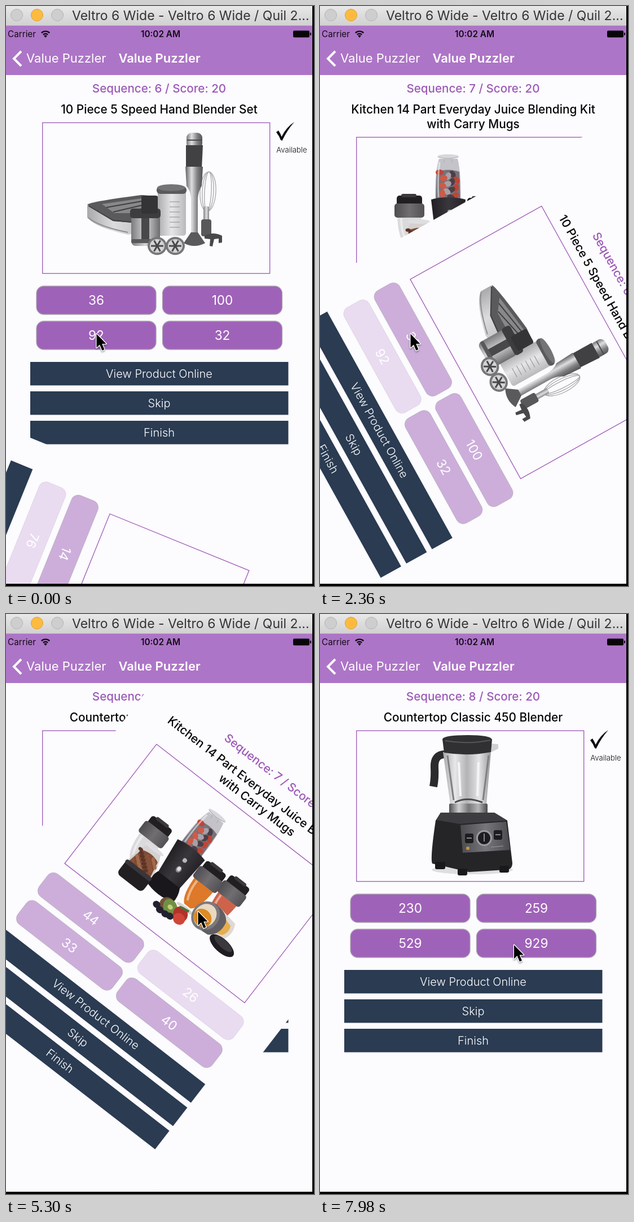
Animation of 546x1025 px, one loop 8 s. Source, as an HTML page with a canvas:

```html
<!DOCTYPE html>
<html lang="en">
<head>
<meta charset="utf-8">
<title>Value Puzzler</title>
<style>
html, body { margin: 0; width: 100%; height: 100%; overflow: hidden; background: #000; }
canvas { display: block; }
</style>
</head>
<body>
<canvas id="stage" width="546" height="1025"></canvas>
<script>
const ctx = document.getElementById('stage').getContext('2d');
const LOOP = 8000, MID = 271.5, CENTER_Y = 528;
const PAPER = '#fcfbfe', PURPLE = '#9b59b6', BUTTON = '#9f62b9', NAVY = '#2a3b52', NAV = '#ad75c7';
const SANS = 'Inter, sans-serif', HELV = '"Liberation Sans", Arial, sans-serif';

function box(color, x, y, w, h, r = 0) {
  ctx.fillStyle = color;
  ctx.beginPath();
  ctx.roundRect(x, y, w, h, r);
  ctx.fill();
}
function oval(color, x, y, rx, ry = rx, turn = 0) {
  ctx.fillStyle = color;
  ctx.beginPath();
  ctx.ellipse(x, y, rx, ry, turn, 0, 7);
  ctx.fill();
}
function shape(color, d) {
  ctx.fillStyle = color;
  ctx.fill(new Path2D(d));
}
function line(color, width, d) {
  ctx.strokeStyle = color;
  ctx.lineWidth = width;
  ctx.stroke(new Path2D(d));
}
function text(str, x, y, font, color, align = 'center') {
  ctx.font = font;
  ctx.fillStyle = color;
  ctx.textAlign = align;
  ctx.fillText(str, x, y);
}
function shade(x0, x1, ...colors) {
  const g = ctx.createLinearGradient(x0, 0, x1, 0);
  colors.forEach((c, i) => g.addColorStop(i / (colors.length - 1), c));
  return g;
}

function handBlender() {
  shape(shade(144, 236, '#a9a9ab', '#dcdcde', '#c4c4c6'), 'M144 352L190 374L280 366L236 401L216 404Q160 392 144 374Z');
  shape('#5a5a5c', 'M144 351Q148 346 240 334L280 337L278 362L236 384L190 380Z');
  shape('#88888a', 'M170 350L240 340L262 342L226 366L192 366Z');
  line('#3f3f41', 2, 'M178 356L246 344M190 364L250 350M146 353L190 379L236 383');
  line('#8e8e90', 2, 'M146 374Q165 390 216 400');
  box(shade(268, 319, '#a9a9ab', '#e6e6e8', '#b9b9bb'), 269, 322, 50, 84, 5);
  for (let y = 346; y < 398; y += 9) line('#8d8d90', 1, `M290 ${y}h18`);
  box('#5a5a5c', 267, 319, 53, 13, 6);
  oval('#747476', 293, 321, 25, 6);
  box(shade(221, 273, '#77777a', '#d5d5d7', '#6c6c6f'), 222, 368, 51, 56, 8);
  box('#48484a', 240, 366, 14, 50, 4);
  box('#59595b', 222, 412, 51, 7, 3);
  box('#3d3d3f', 220, 358, 54, 17, 5);
  box('#343436', 240, 335, 29, 32, 4);
  ctx.strokeStyle = '#a6a6a9';
  ctx.lineWidth = 1.3;
  for (const r of [6, 10, 14]) {
    ctx.beginPath();
    ctx.ellipse(358, 328, r, 35, .05, 0, 7);
    ctx.stroke();
  }
  box(shade(350, 361, '#858588', '#dededf', '#707073'), 350, 354, 10, 30, 3);
  box('#58585b', 346, 377, 18, 30, 4);
  const steel = shade(319, 349, '#6d6d70', '#dededf', '#818184', '#505053');
  box(steel, 320, 224, 28, 28, 9);
  line('#4b4b4e', 2, 'M321 237H347');
  shape('#414144', 'M319 246H349L347 287H319Z');
  shape(steel, 'M318 284H349L347 318Q341 327 340 340V402H328V340Q327 326 320 318Z');
  shape('#5a5a5d', 'M328 400H340L353 419Q334 429 315 419Z');
  for (const x of [268, 300]) {
    oval('#77777a', x, 424, 17, 16);
    oval('#d4d4d6', x, 424, 13, 12);
    for (let a = 0; a < 6.2; a += 1.05)
      line('#48484b', 3, `M${x} 424l${11 * Math.cos(a)} ${11 * Math.sin(a)}`);
  }
  shape('#48484b', 'M352 406Q367 398 383 406V418L377 419V411L369 412L366 425L361 424L362 412L352 411Z');
}

function travelCup(x, y, w, juice) {
  shape(juice, `M${x + 5} ${y + 36}H${x + w - 5}Q${x + w - 6} ${y + 78} ${x + w / 2 + 7} ${y + 88}H${x + w / 2 - 7}Q${x + 6} ${y + 78} ${x + 5} ${y + 36}Z`);
  line('rgba(255,255,255,.45)', 4, `M${x + 12} ${y + 42}Q${x + 12} ${y + 66} ${x + 20} ${y + 80}`);
  box('#211f22', x + 4, y + 2, w - 8, 18, 5);
  box('#3b393c', x + 12, y - 1, w - 26, 6, 3);
  box(shade(x, x + w, '#4e4c50', '#716e72', '#535155'), x, y + 16, w, 25, 5);
}

function drinkSet() {
  travelCup(306, 331, 51, '#cf634a');
  travelCup(132, 333, 53, '#dadadd');
  oval('#d9d3d0', 282, 431, 18, 4);
  travelCup(257, 337, 52, '#dd7928');
  shape('#c3c3c9', 'M211 270H244Q251 300 249 343H205Q202 300 211 270Z');
  shape('#77727a', 'M207 293Q228 286 247 293L249 343H205Z');
  for (let i = 0; i < 14; i++)
    oval(['#bd4537', '#4b4048', '#a9a0a5', '#cf5a48'][i % 4], 212 + i * 23 % 31, 294 + i * 3.4, 7, 5, i);
  line('rgba(255,255,255,.5)', 3, 'M212 276Q208 305 210 338');
  oval('#d8d8dc', 227, 266, 19, 4);
  line('#aaaab0', 1, 'M210 267Q227 272 245 267M220 271V277M234 271V277');
  shape(shade(197, 258, '#201e21', '#3a373c', '#242226'), 'M197 342Q227 334 258 342L253 410H205Z');
  shape('#19171b', 'M204 408H253Q260 421 259 435Q228 445 199 435Q200 419 204 408Z');
  oval('#b7b7bb', 230, 364, 4);
  oval('#8a8a8e', 231, 383, 5, 6);
  oval('#e0e0e2', 231, 382, 3, 4);
  shape('#d5d1d0', 'M162 381H189Q202 402 202 426H150Q151 397 162 381Z');
  shape('#7d4c36', 'M158 396Q176 388 194 396L200 426H152Z');
  for (let i = 0; i < 20; i++)
    oval(['#5d3426', '#a36a4a', '#8a5239'][i % 3], 156 + i * 29 % 41, 396 + i * 1.4, 4.5, 3, i);
  oval('#dedee0', 175, 381, 20, 4);
  box('#221f23', 148, 424, 56, 32, 8);
  box('#39363b', 147, 424, 57, 8, 4);
  shape('#ded9d2', 'M326 391L369 398Q378 413 370 431L330 444Z');
  shape('#e7ad4e', 'M347 401L365 406Q371 417 363 428L346 434Z');
  shape('#615e63', 'M318 391Q348 391 355 407Q360 431 342 443L316 445Z');
  oval('#7c797d', 319, 419, 24, 27, .1);
  oval('#e9d9c0', 318, 419, 19, 22, .1);
  oval('#dd8b23', 317, 425, 17, 15, .2);
  oval('#1f1d21', 374, 443, 27, 12, .08);
  oval('#3c393e', 374, 439, 20, 7, .08);
  oval('#71523a', 253, 445, 14, 13);
  oval('#719044', 260, 445, 15, 12, .5);
  oval('#bfd079', 260, 445, 5, 4);
  oval('#b33229', 282, 444, 14, 13, .7);
  oval('#cf4638', 285, 452, 11, 10);
  line('#4a7338', 4, 'M273 434L291 431');
  for (const [x, y] of [[238, 456], [248, 460], [260, 460], [269, 458]]) oval('#242030', x, y, 7, 6);
}

function counterBlender() {
  oval('#dedde0', 270, 452, 72, 8);
  line('#2b2b2e', 14, 'M222 248Q202 248 203 271Q204 290 201 305');
  shape(shade(218, 303, '#a9a9ac', '#e7e7e9', '#b3b3b6', '#e5e5e7', '#99999c'), 'M218 244H303L295 336H231Z');
  line('#808083', 3, 'M226 250L237 329M299 250L289 329');
  line('#f4f4f5', 4, 'M246 262L249 322M281 262L279 322');
  line('#4b4b4e', 3, 'M239 333Q260 322 288 333');
  shape('#d0d0d3', 'M300 229L316 230V238L302 245Z');
  shape('#303033', 'M217 221Q220 214 262 214Q303 214 305 222L303 244Q262 252 220 245Z');
  line('#55555a', 2, 'M222 224Q262 231 302 223');
  box(shade(229, 298, '#505053', '#cfcfd2', '#77777a', '#b5b5b8', '#444447'), 229, 335, 68, 19, 2);
  shape('#252528', 'M214 351H309L332 365L341 440Q341 453 328 452L264 456L199 441Q195 432 205 365Z');
  shape('#3d3d41', 'M214 351H309L332 365L247 371L206 364Z');
  shape(shade(250, 338, '#4c4c50', '#77777b', '#49494d'), 'M249 373L330 367L337 417L253 422Z');
  oval('#9c9ca0', 291, 396, 14);
  oval('#1d1d20', 291, 396, 11);
  box('#1d1d20', 257, 388, 15, 17, 3);
  box('#1d1d20', 308, 382, 15, 17, 3);
  line('#88888c', 2, 'M291 388V402M260 396H269M311 390H320');
  oval('#c49346', 262, 414, 3);
  line('#9a9a9e', 1, 'M303 412L325 410');
  box('#19191c', 204, 438, 18, 13, 3);
  box('#19191c', 244, 450, 17, 12, 3);
  box('#19191c', 318, 445, 17, 12, 3);
}

function comingSoon() {
  const gray = '#c8c8ca';
  shape(gray, 'M237 261L243 247H285L291 261Z');
  box(gray, 211, 254, 17, 8, 2);
  box(gray, 204, 261, 120, 72, 2);
  line(PAPER, 3, 'M204 284H234M294 284H324');
  box(PAPER, 294, 267, 23, 9);
  box(PAPER, 215, 295, 5, 26);
  box(PAPER, 248, 251, 32, 6);
  oval(PAPER, 264, 295, 35);
  oval(gray, 264, 295, 30);
  oval(PAPER, 264, 295, 22);
  oval(gray, 264, 295, 18);
  oval(PAPER, 264, 295, 11);
  oval(gray, 264, 295, 8);
  ctx.letterSpacing = '-1.5px';
  text('Product Image', 266, 393, '46px ' + HELV, gray);
  text('Coming Soon', 265, 443, 'bold 46px ' + HELV, gray);
  ctx.letterSpacing = '0px';
}

const pages = [
  { seq: 5, title: [''], prices: [14, '', 76, ''], pick: 2, fall: -25.3, rate: 4.81, photo() {} },
  { seq: 6, title: ['10 Piece 5 Speed Hand Blender Set'], prices: [36, 100, 92, 32], pick: 2,
    fall: 34.9, rate: 4.653, photo: handBlender },
  { seq: 7, title: ['Kitchen 14 Part Everyday Juice Blending Kit', 'with Carry Mugs'], prices: [44, 26, 33, 40], pick: 1,
    fall: 103.4, rate: 4.96, photo: drinkSet },
  { seq: 8, title: ['Countertop Classic 450 Blender'], prices: [230, 259, 529, 929], pick: -1,
    fall: Infinity, photo: step => step < 133 ? comingSoon() : counterBlender() }
];

function drawPage(page, step) {
  const shift = page.title.length > 1 ? 25.7 : 0;
  const answered = step > page.fall - 4;
  box(PAPER, -7, 35, 554, 990);
  text(`Sequence: ${page.seq} / Score: 20`, MID, 153, '500 20.6px ' + SANS, PURPLE);
  page.title.forEach((row, i) => text(row, MID, 190 + i * 25.7, '500 20.8px ' + SANS, '#050505'));

  page.photo(step);

  ctx.save();
  ctx.translate(0, shift);
  ctx.strokeStyle = PURPLE;
  ctx.lineWidth = 1.3;
  ctx.strokeRect(64.7, 206.3, 403, 266.3);
  shape('#0b0b0b', 'M479 223L483 220Q487 226 488.5 231Q497 214 511 205Q498 220 489.5 238L487 237Q484 229 479 223Z');
  text('Available', 506.5, 259, '300 13.2px ' + SANS, '#111');
  page.prices.forEach((price, i) => {
    const x = i % 2 ? 277.5 : 54, y = i > 1 ? 557 : 495;
    ctx.globalAlpha = !answered ? 1 : i === page.pick ? .2 : .5;
    box(BUTTON, x, y, 212, 50, 13);
    ctx.strokeStyle = '#aaa3ae';
    ctx.lineWidth = 1.3;
    ctx.stroke();
    ctx.globalAlpha = 1;
    text(price, x + 106, y + 33, '22.6px ' + SANS, '#fff');
  });
  ['View Product Online', 'Skip', 'Finish'].forEach((label, i) => {
    box(NAVY, 43, 629 + i * 52, 457.5, 41.5);
    text(label, MID, 657 + i * 52, '300 20px ' + SANS, '#fff');
  });
  ctx.restore();
}

// Steady spin around the card centre while it accelerates down and left.
function drawFalling(page, step) {
  const deg = (step - page.fall) * page.rate;
  if (deg > 220) return;
  const dx = -(.0146 + .0000235 * deg) * deg * deg;
  const dy = (.0447 - .000015 * deg) * deg * deg;
  ctx.save();
  ctx.translate(MID + dx, CENTER_Y + dy);
  ctx.rotate(deg * Math.PI / 180);
  ctx.translate(-MID, -CENTER_Y);
  drawPage(page, step);
  ctx.restore();
}

function drawChrome() {
  const bar = ctx.createLinearGradient(0, 0, 0, 35);
  bar.addColorStop(0, '#e9e8e9');
  bar.addColorStop(1, '#d1d0d1');
  box(bar, 0, 0, 543, 35);
  box('#b4b2b4', 0, 34.3, 543, 1);
  ['#cfcecf', '#fcbb3f', '#cfcecf'].forEach((color, i) => {
    oval(color, 19 + i * 36, 16, 10.5);
    ctx.strokeStyle = i === 1 ? '#dfa033' : '#b5b4b5';
    ctx.lineWidth = 1;
    ctx.stroke();
  });
  text('Veltro 6 Wide - Veltro 6 Wide / Quil 2...', 117, 25, '23px ' + SANS, '#353435', 'left');

  box(NAV, 0, 35, 543, 87);
  text('Carrier', 3, 55, '15.3px ' + SANS, '#120d15', 'left');
  text('10:02 AM', 274, 55, '600 15.3px ' + SANS, '#120d15');
  ctx.lineWidth = 2.3;
  ctx.strokeStyle = '#120d15';
  for (const r of [6, 10.3]) {
    ctx.beginPath();
    ctx.arc(70, 55, r, -2.35, -.79);
    ctx.stroke();
  }
  shape('#120d15', 'M70 56L67 52.5Q70 50.5 73 52.5Z');
  box('#08060a', 509, 43.5, 29, 12, 2);
  box('#08060a', 539, 47, 2, 5, 1);
  line('#fff', 4, 'M27 80L14 93L27 106');
  text('Value Puzzler', 36, 100, '22px ' + SANS, '#fff', 'left');
  text('Value Puzzler', 272, 100, '600 22px ' + SANS, '#fff');
  box('#000', 543, 35, 3, 990);
  box('#000', 0, 1021, 546, 4);
}

function ease(step, from, to) {
  const p = Math.min(1, Math.max(0, (step - from) / (to - from)));
  return p * p * (3 - 2 * p);
}
function drawCursor(step) {
  const across = ease(step, 72, 85), down = ease(step, 146, 160);
  ctx.save();
  ctx.translate(160.5 + 180 * across + 3.5 * down, 579.5 - 53.5 * across + 59 * down);
  ctx.scale(.9, .9);
  ctx.shadowColor = 'rgba(0,0,0,.35)';
  ctx.shadowBlur = 3;
  ctx.shadowOffsetY = 2;
  const arrow = 'M0 0V27L6.2 21.2L11 32.5L15.5 30.5L10.8 19.4H19Z';
  ctx.lineJoin = 'round';
  line('#fff', 3, arrow);
  ctx.shadowColor = 'transparent';
  shape('#000', arrow);
  ctx.restore();
}

// Three picture steps every 140 ms, held for 20, 20 and 100 ms.
function stepAt(ms) {
  const beat = Math.floor((ms - 120) / 140), rest = ms - 120 - beat * 140;
  return beat * 3 + (rest < 20 ? 0 : rest < 40 ? 1 : 2);
}

function draw(ms) {
  const step = stepAt(ms);
  const current = pages.findIndex(page => step < page.fall);
  ctx.fillStyle = '#000';
  ctx.fillRect(0, 0, 546, 1025);
  ctx.save();
  ctx.beginPath();
  ctx.rect(0, 122, 543, 899);
  ctx.clip();
  drawPage(pages[current], step);
  if (current > 0) drawFalling(pages[current - 1], step);
  ctx.restore();
  drawChrome();
  drawCursor(step);
}

let start;
function tick(now) {
  start ??= now;
  draw((now - start) % LOOP);
  requestAnimationFrame(tick);
}
draw(0);
requestAnimationFrame(tick);
</script>
</body>
</html>
```
